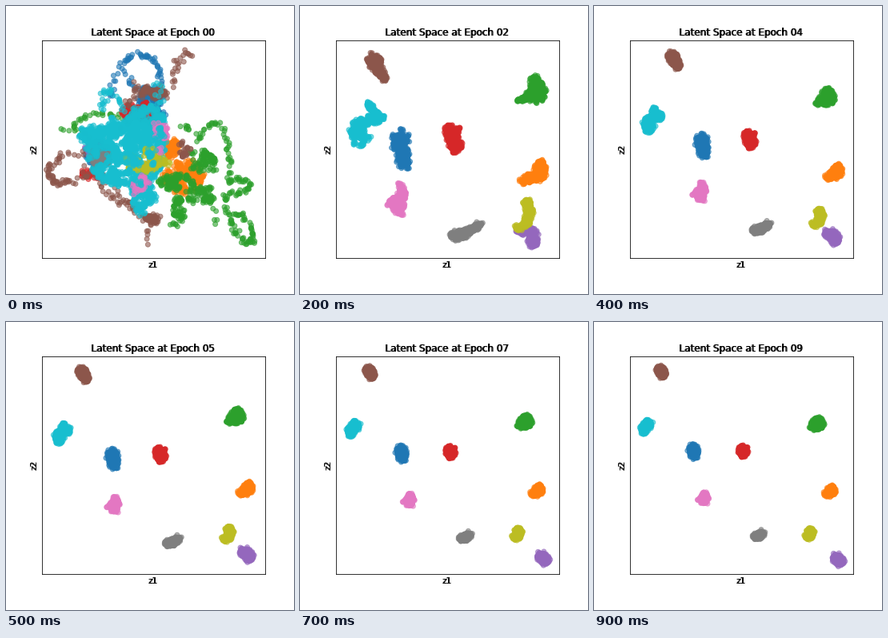
A matplotlib script for the animation above (1000 ms loop, 360 by 360 pixels).

```python
import math
import numpy as np
import matplotlib.pyplot as plt
from matplotlib.animation import FuncAnimation
from matplotlib.colors import to_rgba_array

SIZE, DPI = 360, 72
LEFT, RIGHT, TOP, BOTTOM = 45, 324, 43.2, 315
DOTS_PER_CLUMP = 6
CLUMPS = 80
SHRINK = 0.22  # share of a loose shape's length that survives settling

tangle = []    # (color, dots) layers of the untrained space
clusters = []  # separated classes, in drawing order


def clumps(cores, rng, spread=1.4):
    """Short runs of dots around each core give the lumpy outline."""
    dots = np.repeat(cores, DOTS_PER_CLUMP, axis=0)
    return dots + rng.normal(0, spread, dots.shape)


def disc(rng, count):
    angle = rng.uniform(0, 2 * np.pi, count)
    return np.sqrt(rng.random(count))[:, None] * np.column_stack([np.cos(angle), np.sin(angle)])


def cloud(color, x, y, rx, ry, density=0.026):
    rng = np.random.default_rng(len(tangle))
    cores = disc(rng, int(np.pi * rx * ry * density)) * (rx - 4, ry - 4) + (x, y)
    tangle.append((color, clumps(cores, rng, 2)))


def trail(color, *controls, spread=1.8):
    """Loose chain of dots along a Bezier curve."""
    rng = np.random.default_rng(len(tangle))
    points = np.array(controls, float)
    length = np.hypot(*np.diff(points, axis=0).T).sum()
    t = np.sort(rng.random(int(length * 0.3)))[:, None]
    n = len(points) - 1
    curve = sum(math.comb(n, k) * t**k * (1 - t)**(n - k) * p for k, p in enumerate(points))
    tangle.append((color, curve + rng.normal(0, spread, curve.shape)))


def spine(start_radius, end_radius, *points):
    """Rows of x, y, radius for a tapering tube."""
    return np.column_stack([points, np.linspace(start_radius, end_radius, len(points))]).astype(float)


def tube(nodes, seed):
    rng = np.random.default_rng(seed)
    x, y, r = nodes.T
    mid = (r[1:] + r[:-1]) / 2
    weight = mid * (np.hypot(np.diff(x), np.diff(y)) + mid)
    s = np.concatenate([[0], np.cumsum(weight)])
    at = rng.random(CLUMPS) * s[-1]
    px, py, pr = (np.interp(at, s, v) for v in (x, y, r))
    reach = np.maximum(pr - 4.5, 0)[:, None]
    return clumps(np.column_stack([px, py]) + reach * disc(rng, CLUMPS), rng)


def cluster(color, early, loose, settled, bend):
    """First shape, second shape, final (x, y, radius) and sideways drift on the way."""
    center = loose.mean(axis=0)
    tight = np.array(settled, float) + (loose - center) * (SHRINK, SHRINK, 0)
    clusters.append((color, early, loose, tight, np.array([*bend, 0.0])))


def pose(early, loose, tight, bend, epoch):
    if epoch == 1:
        return early
    t = epoch - 2
    return tight + (loose - tight) * math.exp(-0.45 * t) + bend * t * math.exp(-t * t / 9)


# Untrained space: overlapping clouds with trails running out of them
trail("tab:blue", (132, 115), (135, 45), (195, 45), (196, 105))
trail("tab:blue", (146, 80), (158, 105), (182, 112))
cloud("tab:blue", 182, 124, 20, 26)
cloud("tab:blue", 114, 184, 17, 20)
cloud("tab:orange", 208, 178, 12, 17)
cloud("tab:orange", 222, 213, 28, 24)
trail("tab:green", (70, 153), (98, 150), (104, 170))
trail("tab:green", (85, 152), (105, 122), (150, 142))
trail("tab:green", (215, 148), (230, 152), (243, 170))
trail("tab:green", (242, 168), (258, 130), (282, 140), (279, 215))
trail("tab:green", (262, 225), (310, 205), (325, 235), (270, 235))
trail("tab:green", (272, 232), (285, 320), (330, 320), (310, 250), (278, 260))
trail("tab:green", (250, 238), (262, 250), (262, 276), spread=2.5)
cloud("tab:green", 244, 195, 20, 20, 0.013)
cloud("tab:green", 214, 222, 27, 14, 0.018)
cloud("tab:green", 214, 258, 11, 22, 0.016)
cloud("tab:green", 243, 236, 22, 14, 0.014)
cloud("tab:red", 166, 132, 24, 15)
cloud("tab:red", 107, 211, 18, 7)
cloud("tab:purple", 115, 180, 18, 14)
trail("tab:brown", (233, 57), (204, 70), (208, 118), spread=2.5)
cloud("tab:brown", 182, 109, 26, 11, 0.018)
trail("tab:brown", (168, 98), (156, 112), (140, 150), spread=4)
trail("tab:brown", (100, 184), (30, 185), (45, 250), (110, 206), spread=2.5)
trail("tab:brown", (98, 206), (130, 232), (166, 258), spread=4)
trail("tab:brown", (130, 240), (188, 255), (176, 298), spread=3)
cloud("tab:brown", 183, 266, 14, 8)
cloud("tab:brown", 222, 182, 11, 14, 0.012)
cloud("tab:cyan", 150, 184, 52, 44)
cloud("tab:cyan", 176, 142, 25, 22)
cloud("tab:cyan", 106, 162, 18, 15)
cloud("tab:cyan", 170, 236, 20, 26)
cloud("tab:gray", 118, 190, 16, 14)
cloud("tab:olive", 174, 193, 32, 18, 0.018)
cloud("tab:pink", 193, 164, 13, 20, 0.016)
cloud("tab:pink", 168, 222, 13, 15, 0.02)
cloud("tab:cyan", 152, 180, 56, 50, 0.007)
trail("tab:cyan", (122, 130), (118, 85), (146, 112), (150, 145), spread=2.5)
trail("tab:cyan", (190, 96), (196, 112), (186, 134), spread=4)

cluster("tab:blue",
        spine(14, 9, (115, 159), (112, 185), (108, 203), (122, 219)),
        spine(14, 11, (125, 164), (125, 180), (130, 198)),
        (124, 161, 8), (8, 5))
cluster("tab:orange",
        spine(10, 13, (228, 209), (254, 203), (271, 190), (279, 199)),
        spine(9, 12, (280, 218), (296, 213), (303, 198), (302, 211)),
        (296, 212, 8), (5, -2))
cluster("tab:green",
        spine(5, 12, (252, 148), (268, 153), (290, 138), (303, 106), (302, 132), (299, 154)),
        spine(5, 13, (270, 117), (285, 117), (294, 91), (300, 106), (294, 117)),
        (278, 129, 9), (5, -4))
cluster("tab:red",
        spine(10, 12, (167, 161), (163, 176), (174, 197)),
        spine(13, 11, (189, 153), (191, 163), (196, 179)),
        (186, 161, 8), (5, 3))
cluster("tab:purple",
        spine(6, 8, (224, 257), (242, 260), (251, 290)),
        spine(6, 10, (269, 281), (291, 282), (291, 297)),
        (306, 298, 8), (0, -4))
cluster("tab:brown",
        spine(8, 12, (102, 82), (97, 65), (84, 78), (91, 105), (86, 130), (103, 172)),
        spine(14, 6, (92, 66), (95, 75), (106, 91)),
        (83, 61, 8), (9, 0))
cluster("tab:pink",
        spine(5, 20, (122, 243), (110, 220), (103, 234), (114, 260), (99, 283), (110, 275)),
        spine(6, 13, (124, 224), (131, 234), (115, 246), (126, 254)),
        (138, 219, 7), (1, 3))
cluster("tab:gray",
        spine(11, 7, (160, 294), (174, 286), (195, 270)),
        spine(11, 6, (193, 288), (207, 284), (226, 273)),
        (206, 266, 7), (2, 4))
cluster("tab:olive",
        spine(9, 11, (229, 269), (246, 266), (254, 263)),
        spine(8, 8, (283, 242), (287, 258), (284, 272), (273, 278)),
        (269, 265, 7), (5, 1))
cluster("tab:cyan",
        spine(6, 17, (95, 124), (106, 139), (84, 152), (78, 180), (74, 214)),
        spine(5, 18, (84, 122), (101, 138), (75, 150), (74, 165)),
        (64, 130, 7), (1, 4))


def layers(epoch):
    if epoch == 0:
        return tangle
    return [(color, tube(pose(*shapes, epoch), seed))
            for seed, (color, *shapes) in enumerate(clusters)]


plt.rcParams["font.family"] = "DejaVu Sans"
fig = plt.figure(figsize=(SIZE / DPI, SIZE / DPI), dpi=DPI, facecolor="white")
ax = fig.add_axes([LEFT / SIZE, 1 - BOTTOM / SIZE, (RIGHT - LEFT) / SIZE, (BOTTOM - TOP) / SIZE])
ax.set(xlim=(LEFT, RIGHT), ylim=(BOTTOM, TOP), xticks=[], yticks=[])
points = ax.scatter([], [], s=36, alpha=0.6)


def heavy_text(x, y, text, shift, **style):
    """Text printed twice, the second time slightly displaced."""
    dx, dy = shift
    return [ax.text(x + k * dx, y + k * dy, text, **style) for k in (0, 1)]


center_x, center_y = (LEFT + RIGHT) / 2, (TOP + BOTTOM) / 2
titles = heavy_text(center_x, TOP - 6, "", (-1, 0), size=12, ha="center", va="baseline")
heavy_text(center_x, BOTTOM + 4, "z1", (-1, 0), size=10, ha="center", va="top")
heavy_text(LEFT - 4, center_y, "z2", (0, -1), size=10, rotation=90, rotation_mode="anchor",
           ha="center", va="bottom")


def update(epoch):
    parts = layers(epoch)
    points.set_offsets(np.vstack([xy for _, xy in parts]))
    points.set_facecolor(np.vstack([np.repeat(to_rgba_array(c), len(xy), axis=0) for c, xy in parts]))
    for title in titles:
        title.set_text(f"Latent Space at Epoch {epoch:02d}")
    return [points, *titles]


anim = FuncAnimation(fig, update, frames=10, interval=100, repeat=True, repeat_delay=0, blit=False)
plt.show()
```
